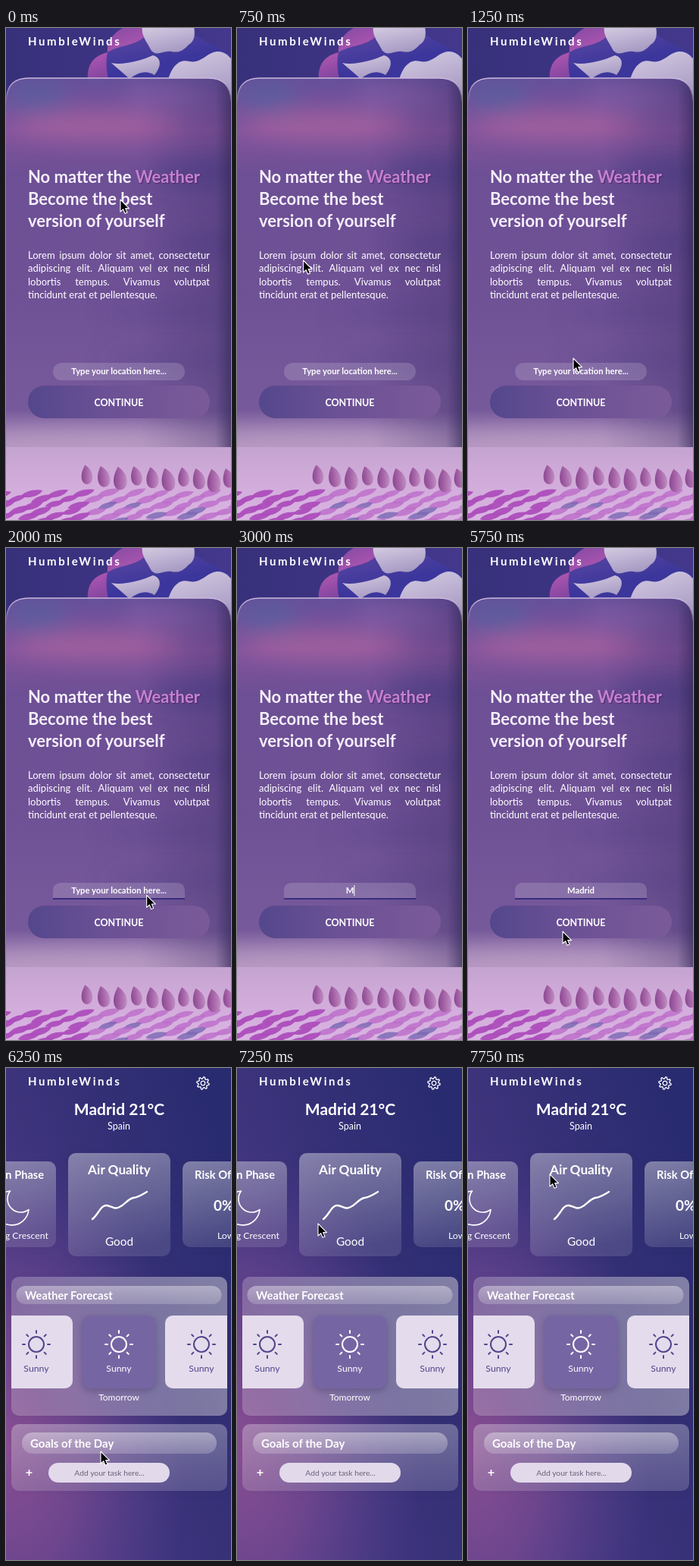
Animation, 297 px wide and 648 px high, one loop 8000 ms. Source, as an HTML page:

```html
<!DOCTYPE html>
<html lang="en">
<head>
<meta charset="utf-8">
<title>Weather app</title>
<style>
  html, body { margin: 0; width: 100%; height: 100%; overflow: hidden; background: #2d2c74; }
  svg { position: absolute; left: 0; top: 0; width: 297px; height: 648px; }
  text, p { font-family: Lato, "Open Sans", sans-serif; fill: #fff; color: #fff; }
  text { white-space: pre; }
  p { margin: 0; font-size: 13px; line-height: 17.4px; white-space: nowrap; }
  .just { text-align: justify; text-align-last: justify; white-space: normal; }
  .b { font-weight: 700; }
  .m { text-anchor: middle; }
  .h { font-size: 22px; font-weight: 700; fill: #f5effa; }
  .shade { filter: drop-shadow(0 3px 5px #2a205055); }
</style>
</head>
<body>
<svg viewBox="0 0 297 648">
  <defs>
    <linearGradient id="sky"><stop stop-color="#37307a"/><stop offset="1" stop-color="#43388c"/></linearGradient>
    <linearGradient id="pink" x2=".5" y2="1"><stop stop-color="#7a469f"/><stop offset=".5" stop-color="#a754ae"/><stop offset="1" stop-color="#6d3d98"/></linearGradient>
    <linearGradient id="blue" x2=".4" y2="1"><stop stop-color="#5a46a0"/><stop offset=".5" stop-color="#3b369c"/><stop offset="1" stop-color="#3f379a"/></linearGradient>
    <linearGradient id="pale" x2=".4" y2="1"><stop stop-color="#d6cce2"/><stop offset="1" stop-color="#a79bc4"/></linearGradient>
    <linearGradient id="land" x2="0" y2="1"><stop stop-color="#c4a3d0"/><stop offset=".4" stop-color="#d0abd9"/><stop offset="1" stop-color="#d9b4e2"/></linearGradient>
    <linearGradient id="bud"><stop stop-color="#8a4790"/><stop offset=".5" stop-color="#a867a9"/><stop offset="1" stop-color="#c08ec4"/></linearGradient>
    <linearGradient id="glass" x2="0" y2="1">
      <stop stop-color="#66509a"/><stop offset=".14" stop-color="#85559d"/><stop offset=".26" stop-color="#6d4f95"/>
      <stop offset=".6" stop-color="#6f5196"/><stop offset=".9" stop-color="#775a9b"/><stop offset="1" stop-color="#b193be"/>
    </linearGradient>
    <linearGradient id="edge"><stop offset=".6" stop-color="#33285f" stop-opacity="0"/><stop offset=".93" stop-color="#33285f" stop-opacity=".25"/><stop offset="1" stop-color="#2c2450" stop-opacity=".65"/></linearGradient>
    <linearGradient id="rim" gradientUnits="userSpaceOnUse" x1="0" y1="66" x2="0" y2="100"><stop stop-color="#cdbadf"/><stop offset="1" stop-color="#cdbadf" stop-opacity="0"/></linearGradient>
    <linearGradient id="button"><stop stop-color="#54478c"/><stop offset=".4" stop-color="#6a5095"/><stop offset="1" stop-color="#7b5a99"/></linearGradient>
    <linearGradient id="night" x1="1" y1="0" x2="0" y2=".75"><stop offset=".1" stop-color="#292b70"/><stop offset=".5" stop-color="#373178"/><stop offset="1" stop-color="#4b3a86"/></linearGradient>
    <radialGradient id="glow" gradientUnits="userSpaceOnUse" cx="0" cy="0" r="1" gradientTransform="translate(5 500) scale(235 400)"><stop stop-color="#8a4f93"/><stop offset=".4" stop-color="#774990" stop-opacity=".8"/><stop offset="1" stop-color="#5a4090" stop-opacity="0"/></radialGradient>
    <linearGradient id="tile" x2=".2" y2="1"><stop stop-color="#fff" stop-opacity=".4"/><stop offset="1" stop-color="#fff" stop-opacity=".13"/></linearGradient>
    <linearGradient id="panel" y1=".2"><stop stop-color="#fff" stop-opacity=".22"/><stop offset="1" stop-color="#d8d4de" stop-opacity=".5"/></linearGradient>
    <linearGradient id="goal" x2="0" y2="1"><stop stop-color="#fff" stop-opacity=".3"/><stop offset="1" stop-color="#fff" stop-opacity=".17"/></linearGradient>
    <linearGradient id="pill" x2="0" y2="1"><stop stop-color="#e6e2ea" stop-opacity=".48"/><stop offset="1" stop-color="#e6e2ea" stop-opacity=".24"/></linearGradient>
    <filter id="blur" x="-50%" y="-50%" width="200%" height="200%"><feGaussianBlur stdDeviation="14"/></filter>
    <clipPath id="cardClip"><path d="M0 552V96Q0 66 30 66H267Q297 66 297 96V552Z"/></clipPath>
    <clipPath id="panelClip"><rect x="7" y="275" width="285" height="183" rx="10"/></clipPath>
    <g id="sun" fill="none" stroke-width="2" stroke-linecap="round"><circle r="10"/></g>
  </defs>

  <g id="welcome">
    <rect width="297" height="100" fill="url(#sky)"/>
    <path d="M108 70C106 46 118 36 134 32C132 16 144 4 160-3H215V70Z" fill="url(#pink)"/>
    <path d="M134 32C150 22 172 24 184 10H250L297 36V100H150C134 78 130 50 134 32Z" fill="url(#blue)"/>
    <path d="M139 46C154 49 176 44 194 36C207 40 204 52 196 62C184 54 172 60 163 67C156 60 148 54 139 46Z" fill="url(#pale)"/>
    <path d="M180-2C178 10 186 18 192 30C200 38 208 29 218 31C228 33 234 30 241 22C249 18 250 8 248-2Z" fill="url(#pale)"/>
    <path d="M213 72C218 50 229 40 242 44C258 47 264 33 278 31C288 30 293 36 297 40V100H213Z" fill="url(#pale)"/>

    <g clip-path="url(#cardClip)">
      <rect y="66" width="297" height="486" fill="url(#glass)"/>
      <g filter="url(#blur)">
        <ellipse cx="40" cy="90" rx="42" ry="20" fill="#56609f" opacity=".75"/>
        <ellipse cx="120" cy="128" rx="110" ry="17" fill="#ab649f" opacity=".7"/>
        <ellipse cx="215" cy="90" rx="60" ry="15" fill="#8a64ac" opacity=".6"/>
        <ellipse cx="262" cy="190" rx="70" ry="22" fill="#50408a" opacity=".55"/>
        <ellipse cx="262" cy="285" rx="60" ry="18" fill="#55448a" opacity=".45"/>
        <ellipse cx="220" cy="375" rx="90" ry="15" fill="#5b4489" opacity=".4"/>
        <ellipse cx="220" cy="438" rx="90" ry="13" fill="#5b4489" opacity=".4"/>
        <ellipse cx="125" cy="545" rx="180" ry="16" fill="#bd9fc6" opacity=".75"/>
      </g>
      <rect y="66" width="297" height="486" fill="url(#edge)"/>
    </g>
    <path d="M.5 100V96Q.5 66 30 66H267Q296.500 66 296.500 96V100" fill="none" stroke="url(#rim)" stroke-width="1.300"/>
    <rect y="552" width="297" height="96" fill="url(#land)"/>
    <g id="meadow"></g>

    <text class="h" x="29" y="204">No matter the <tspan fill="#c681cd" style="text-shadow:1px 1px 1px #4e286e">Weather</tspan></text>
    <text class="h" x="29" y="233">Become the best</text>
    <text class="h" x="29" y="262">version of yourself</text>
    <foreignObject x="29" y="291" width="240" height="75">
      <p class="just">Lorem ipsum dolor sit amet, consectetur<br>adipiscing elit. Aliquam vel ex nec nisl<br>lobortis tempus. Vivamus volutpat</p>
      <p>tincidunt erat et pellentesque.</p>
    </foreignObject>

    <rect id="field" x="62" y="441" width="174" height="23" rx="11.500" fill="#fff" fill-opacity=".16"/>
    <g id="focus">
      <path d="M62 463V452Q62 441 73 441H225Q236 441 236 452V463Z" fill="#fff" fill-opacity=".16"/>
      <path d="M62 462H236" stroke="#3a2c80" stroke-width="2"/>
    </g>
    <text id="entry" class="b m" x="149" font-size="11.250"></text>
    <rect id="caret" y="444" width="1" height="14" fill="#fff"/>
    <rect x="29" y="471" width="240" height="43" rx="21.500" fill="url(#button)"/>
    <text class="b m" x="149" y="497.500" font-size="12.500">CONTINUE</text>
  </g>

  <g id="home">
    <rect width="297" height="648" fill="url(#night)"/>
    <rect width="297" height="648" fill="url(#glow)"/>
    <g id="gear" transform="translate(260 20)" fill="none" stroke="#fff" stroke-width="1.300" stroke-linejoin="round"><circle r="2.800"/></g>
    <text class="b m" x="149.500" y="62" font-size="21">Madrid 21°C</text>
    <text class="m" x="149" y="81" font-size="12.500">Spain</text>

    <g class="shade" fill="url(#tile)">
      <rect x="-47" y="123" width="113" height="113" rx="10"/>
      <rect x="82" y="112" width="135" height="136" rx="10"/>
      <rect x="233" y="123" width="113" height="113" rx="10"/>
    </g>
    <text class="b" x="50" y="146" font-size="14.600" text-anchor="end">Moon Phase</text>
    <path d="M21 12.800A9 9 0 1 1 11.200 3A7 7 0 0 0 21 12.800Z" transform="translate(-22.500 154.500) scale(2.500)" fill="none" stroke="#fff" stroke-width=".65" stroke-linejoin="round"/>
    <text x="56" y="225" font-size="12.300" text-anchor="end">Waxing Crescent</text>
    <text class="b m" x="149.500" y="140" font-size="17.200">Air Quality</text>
    <path d="M114 199C122 193 125 180 133 181C140 182 143 187 150 183C158 179 160 173 168 171C175 170 181 166 186 163" fill="none" stroke="#fff" stroke-width="2.400" stroke-linecap="round"/>
    <text class="m" x="149.500" y="234" font-size="15.400">Good</text>
    <text class="b" x="249" y="146" font-size="14.800">Risk Of Rain</text>
    <text class="b" x="274" y="188" font-size="19">0%</text>
    <text x="279" y="225" font-size="12.300">Low</text>

    <rect class="shade" x="7" y="275" width="285" height="183" rx="10" fill="url(#panel)"/>
    <rect x="13.500" y="287" width="271" height="24" rx="12" fill="url(#pill)"/>
    <text class="b" x="25" y="304.500" font-size="14.700">Weather Forecast</text>
    <g clip-path="url(#panelClip)" fill="#e4dcec">
      <rect x="-8" y="326" width="96" height="96" rx="10"/>
      <rect class="shade" x="101" y="326" width="96" height="96" rx="10" fill="#7665a3"/>
      <rect x="210" y="326" width="96" height="96" rx="10"/>
    </g>
    <g id="days"></g>
    <text class="m" x="149" y="438" font-size="12">Tomorrow</text>

    <rect class="shade" x="7" y="469" width="285" height="88" rx="10" fill="url(#goal)"/>
    <rect x="21" y="480" width="257" height="28" rx="14" fill="url(#pill)"/>
    <text class="b" x="32" y="499.500" font-size="15">Goals of the Day</text>
    <path d="M26.500 533H34.500M30.500 529V537" stroke="#fff" stroke-width="1.600"/>
    <rect x="56" y="520" width="160" height="26" rx="13" fill="#e2d9eb"/>
    <text class="m" x="136.500" y="537" font-size="10.300" style="fill:#6a6378">Add your task here...</text>
  </g>

  <text class="b" x="29" y="23" font-size="15" letter-spacing="2.600">HumbleWinds</text>
  <path id="pointer" d="M0 0V16L3.700 12.700L6 18.300L9 17L6.700 11.600H11.500Z" fill="#000" stroke="#fff" stroke-width="1.100" stroke-linejoin="round"/>
</svg>
<script>
const $ = id => document.getElementById(id);
const add = (id, markup) => $(id).insertAdjacentHTML('beforeend', markup);
const show = (id, on) => $(id).style.display = on ? '' : 'none';

let seed = 7;
const rand = () => (seed = seed * 16807 % 2147483647) / 2147483647;

// Meadow: rows of pointed leaves, paler and bluer to the right, then a line of buds
for (let row = 0; row < 6; row++) {
  for (let col = 0; col < 10; col++) {
    const x = col * 34 + row % 2 * 17 + rand() * 8 - 6;
    const y = 612 + row * 7.5 + rand() * 3;
    const near = x < 115;
    const fill = near ? '#ad4dbc' : rand() < .25 ? '#7868b2' : '#bb6cc9';
    add('meadow', `<path d="M-16 1C-9-6 6-6 16-2C10 5-6 6-16 1Z" fill="${fill}" opacity="${near ? .95 : .8}"
      transform="translate(${x} ${y}) rotate(${-8 - rand() * 8}) scale(${.8 + rand() * .2})"/>`);
  }
}
for (let i = 0; i < 10; i++)
  add('meadow', `<path d="M-3-15C5-10 9-2 8 5C6 16-6 16-8 5C-9-3-6-9-3-15Z" fill="url(#bud)"
    transform="translate(${107 + i * 22.3 - i * i * .17} ${589 + i % 3 * 2 + i * .5}) rotate(${i % 2 * -6}) scale(${.9 + i % 3 * .09})"/>`);

for (let a = 0; a < 360; a += 45)
  add('sun', `<path d="M0-15V-18" transform="rotate(${a})"/>`);
[40, 149, 258].forEach(x => {
  const color = x === 149 ? '#fff' : '#51458c';
  add('days', `<use href="#sun" x="${x}" y="364" stroke="${color}"/>
    <text class="m" x="${x}" y="400" font-size="12.300" style="fill:${color}">Sunny</text>`);
});

const teeth = [];
for (let i = 0; i < 32; i++) {
  const a = (i + .5) * Math.PI / 16, r = i % 4 < 2 ? 8.2 : 6;
  teeth.push(`${r * Math.cos(a)},${r * Math.sin(a)}`);
}
add('gear', `<polygon points="${teeth.join(' ')}"/>`);

// Pointer path: time, x, y
const path = [
  [0, 151, 226], [250, 112, 203], [500, 69, 222], [1000, 106, 390], [1250, 139, 435],
  [1500, 142, 446], [1750, 150, 450], [2500, 257, 472], [3000, 257, 472],
  [5250, 229, 511], [5500, 165, 508], [5750, 125, 505],
  [6250, 125, 505], [6500, 123, 480], [7000, 111, 310], [7250, 107, 205], [7500, 107, 205], [7750, 108, 140]
];

function pointerAt(t) {
  const i = path.findIndex(p => p[0] > t);
  if (i < 0) return path.at(-1).slice(1);
  const [t0, x0, y0] = path[i - 1], [t1, x1, y1] = path[i];
  const k = (t - t0) / (t1 - t0);
  return [x0 + (x1 - x0) * k, y0 + (y1 - y0) * k];
}

// Time from which each number of letters is shown
const typing = [[3000, 1], [3250, 2], [3750, 4], [4000, 5], [4250, 6]];

function draw() {
  const t = Math.floor(performance.now() % 8000 / 250) * 250;
  const home = t >= 6250, focused = t >= 1750;
  const letters = typing.reduce((n, [at, count]) => t >= at ? count : n, 0);
  show('welcome', !home);
  show('home', home);
  show('field', !focused);
  show('focus', focused);

  const entry = $('entry');
  entry.textContent = letters ? 'Madrid'.slice(0, letters) : 'Type your location here...';
  entry.setAttribute('y', focused ? 455 : 456);
  if (!home) $('caret').setAttribute('x', 149 + entry.getComputedTextLength() / 2);
  show('caret', letters && (t < 4750 || t >= 5250 && t < 5750));

  show('pointer', t < 3000 || t >= 5250);
  $('pointer').setAttribute('transform', `translate(${pointerAt(t)})`);
  requestAnimationFrame(draw);
}
draw();
</script>
</body>
</html>
```
